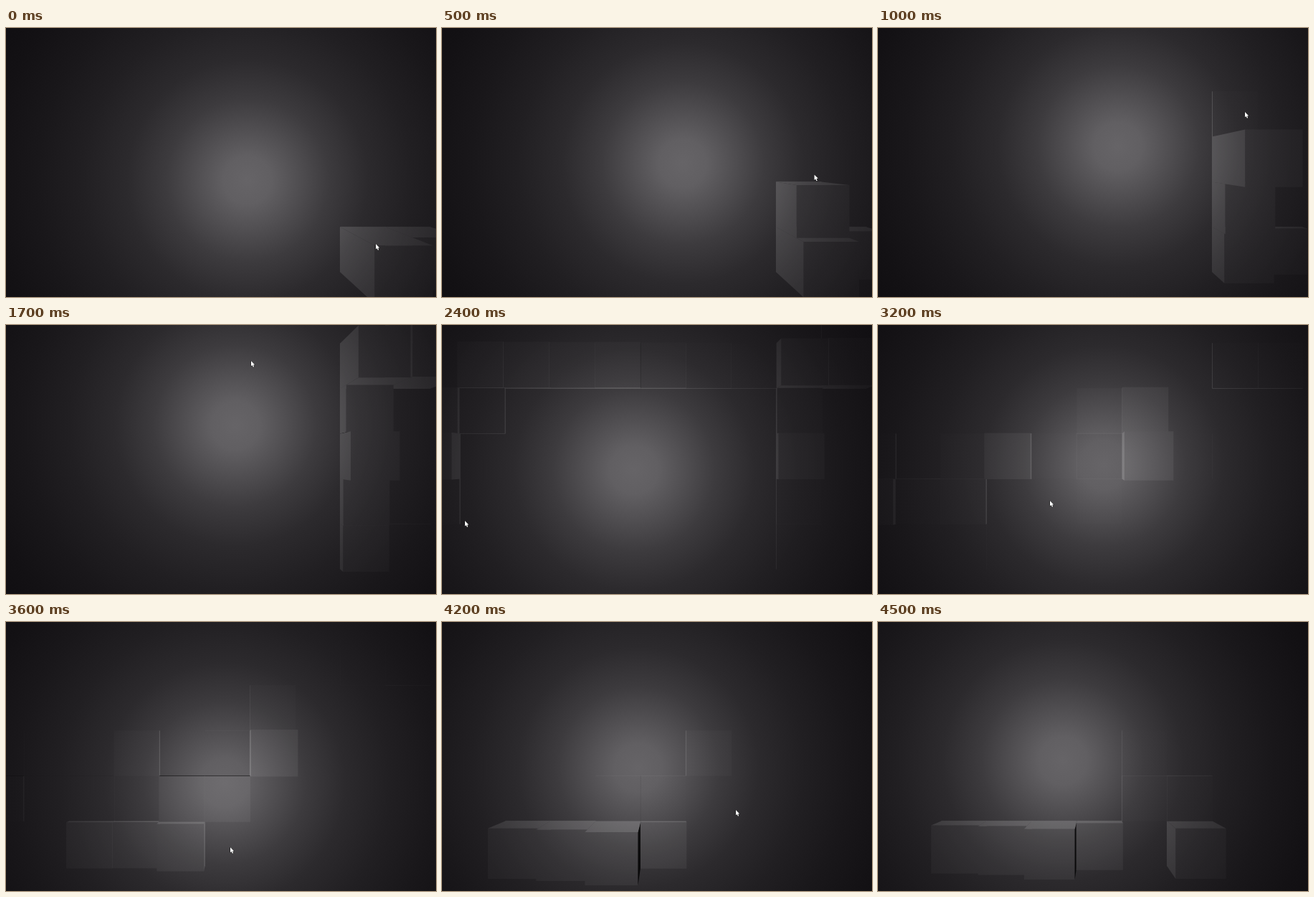
An HTML page with a canvas for the animation above (4.6 s loop, 600x375 px).

```html
<!DOCTYPE html>
<html lang="en">
<head>
<meta charset="utf-8">
<title>Raised tiles</title>
<style>
html, body { margin: 0; width: 100%; height: 100%; overflow: hidden; background: #171518; }
canvas { display: block; }
</style>
</head>
<body>
<canvas id="stage" width="600" height="375"></canvas>
<script>
const ctx = document.getElementById('stage').getContext('2d');
const W = 600, H = 375, LOOP = 4600, STEP = 100;
const CX = 300, CY = 187.5, CELL = 63, ORIGIN = 25.4;
const COLS = 11, ROWS = 7;
// Lift follows the pointer with a delay and sinks at a steady rate; height is lift cubed.
const DELAY = 0.12, TOP = 0.62, GAIN = 9, SINK = 0.24, DT = 0.01;

// key points: time (s), x, y
const path = [
  [-1, 560, 310], [-0.5, 528, 305], [0, 516, 301], [0.2, 518, 276], [0.45, 520, 212],
  [0.86, 516, 150], [1, 512, 117], [1.03, 525, 84], [1.1, 550, 60], [1.22, 548, 18],
  [1.35, 550, 32], [1.42, 525, 50], [1.6, 462, 50], [1.7, 342, 50], [2.05, 45, 80],
  [2.12, 18, 120], [2.32, 12, 255], [2.4, 32, 273], [2.52, 110, 284],
  [2.6, 115, 205], [2.74, 208, 170], [2.86, 360, 122], [3, 370, 195],
  [3.1, 305, 225], [3.2, 240, 245], [3.3, 85, 345], [3.4, 220, 310],
  [3.55, 265, 300], [3.6, 313, 314], [3.75, 230, 300], [3.95, 95, 285],
  [4.1, 272, 295], [4.2, 410, 262], [4.4, 418, 345]
];
const light = [
  [0, 337, 212], [1, 335, 165], [1.7, 320, 140], [2.05, 277, 155],
  [2.4, 268, 202], [3, 320, 181], [3.6, 305, 224], [4.5, 258, 193]
];

const project = (x, y, s) => [CX + (x - CX) * s, CY + (y - CY) * s];

function along(keys, t) {
  let i = 0;
  while (i < keys.length - 2 && t > keys[i + 1][0]) i++;
  const a = keys[i], b = keys[i + 1];
  const u = Math.max(0, Math.min(1, (t - a[0]) / (b[0] - a[0])));
  return [a[1] + (b[1] - a[1]) * u, a[2] + (b[2] - a[2]) * u];
}

function makeTiles() {
  const tiles = [];
  for (let n = 0; n < COLS * ROWS; n++) {
    const x = ORIGIN + (n % COLS - 1) * CELL;
    const y = ORIGIN + (Math.floor(n / COLS) - 1) * CELL;
    tiles.push({ x, y, lift: 0, far: Math.hypot(x + CELL / 2 - CX, y + CELL / 2 - CY) });
  }
  return tiles.sort((a, b) => b.far - a.far);
}

// Heights of all tiles at each step of the loop.
function simulate(tiles) {
  const frames = [], ticks = Math.round(STEP / 1000 / DT);
  for (let n = -100; n <= LOOP / 1000 / DT; n++) {
    const [px, py] = along(path, n * DT - DELAY);
    for (const tile of tiles) {
      const over = px >= tile.x && px < tile.x + CELL && py >= tile.y && py < tile.y + CELL;
      if (over) tile.lift += (TOP - tile.lift) * GAIN * DT;
      else tile.lift = Math.max(0, tile.lift - SINK * DT);
    }
    if (n >= 0 && n % ticks === 0) frames.push(tiles.map(tile => tile.lift ** 3));
  }
  return frames;
}

function radial([x, y], radius, stops, colour) {
  const g = ctx.createRadialGradient(x, y, 0, x, y, radius);
  stops.forEach(([at, v]) => g.addColorStop(at, colour(v)));
  return g;
}

const backdrop = lamp => radial(lamp, 420,
  [[0, 102], [0.08, 97], [0.16, 82], [0.27, 61], [0.4, 44], [0.55, 33], [0.7, 25], [0.85, 19], [1, 15]],
  v => `rgb(${v},${v - 2},${v + 1})`);

const glow = lamp => radial(lamp, 340, [[0, 0.2], [0.35, 0.17], [0.6, 0.1], [1, 0.03]],
  a => `rgba(255,255,255,${a})`);

function trace(points) {
  ctx.beginPath();
  points.forEach(p => ctx.lineTo(p[0], p[1]));
  ctx.closePath();
}

function drawWall(a, b, z, scene, lit) {
  const s = 1 / (1 - z);
  trace([a, b, project(...b, s), project(...a, s)]);
  ctx.fillStyle = scene.back;
  ctx.fill();
  ctx.fillStyle = lit ? scene.glow : 'rgba(0,0,0,0.8)';
  ctx.fill();
  ctx.beginPath();
  ctx.moveTo(...a);
  ctx.lineTo(...b);
  ctx.strokeStyle = ctx.fillStyle;
  ctx.globalAlpha = 0.5 * Math.min(1, z / 0.002);
  ctx.stroke();
  ctx.globalAlpha = 1;
}

function drawTile({ x, y }, z, scene) {
  const r = x + CELL, b = y + CELL, s = 1 / (1 - z);
  const [fx, fy] = project(x, y, s), size = CELL * s;
  const [lx, ly] = scene.lamp;

  ctx.fillStyle = scene.back;
  ctx.fillRect(fx, fy, size, size);
  ctx.globalAlpha = 0.35 * Math.min(1, z / 0.02);
  ctx.fillStyle = scene.glow;
  ctx.fillRect(fx, fy, size, size);
  ctx.globalAlpha = 1;

  // Only walls facing the middle show; a wall is lit when the lamp is in front of it.
  ctx.lineWidth = 1;
  if (x > CX) drawWall([x, y], [x, b], z, scene, lx < x);
  if (r < CX) drawWall([r, y], [r, b], z, scene, lx > r);
  if (y > CY) drawWall([x, y], [r, y], z, scene, ly < y);
  if (b < CY) drawWall([x, b], [r, b], z, scene, ly > b);
}

function drawPointer(t) {
  if (t > 4.45) return;
  const [x, y] = along(path, t);
  const shape = [[0, 0], [0, 7.6], [1.7, 6.1], [2.9, 8.8], [4.2, 8.3], [3.1, 5.6], [5.3, 5.4]];
  trace(shape.map(p => [x + p[0], y + p[1]]));
  ctx.lineJoin = 'round';
  ctx.lineWidth = 1;
  ctx.strokeStyle = '#111';
  ctx.stroke();
  ctx.fillStyle = '#fff';
  ctx.fill();
}

const tiles = makeTiles();
const frames = simulate(tiles);

function draw(ms) {
  const step = ms < 2 * STEP ? 0 : Math.floor(ms / STEP);
  const t = step * STEP / 1000;
  const lamp = along(light, t);
  const scene = { lamp, back: backdrop(lamp), glow: glow(lamp) };
  ctx.fillStyle = scene.back;
  ctx.fillRect(0, 0, W, H);
  tiles.forEach((tile, i) => {
    if (frames[step][i] > 0.00005) drawTile(tile, frames[step][i], scene);
  });
  drawPointer(t);
}

const begin = performance.now();
function tick() {
  draw((performance.now() - begin) % LOOP);
  requestAnimationFrame(tick);
}
tick();
</script>
</body>
</html>
```
